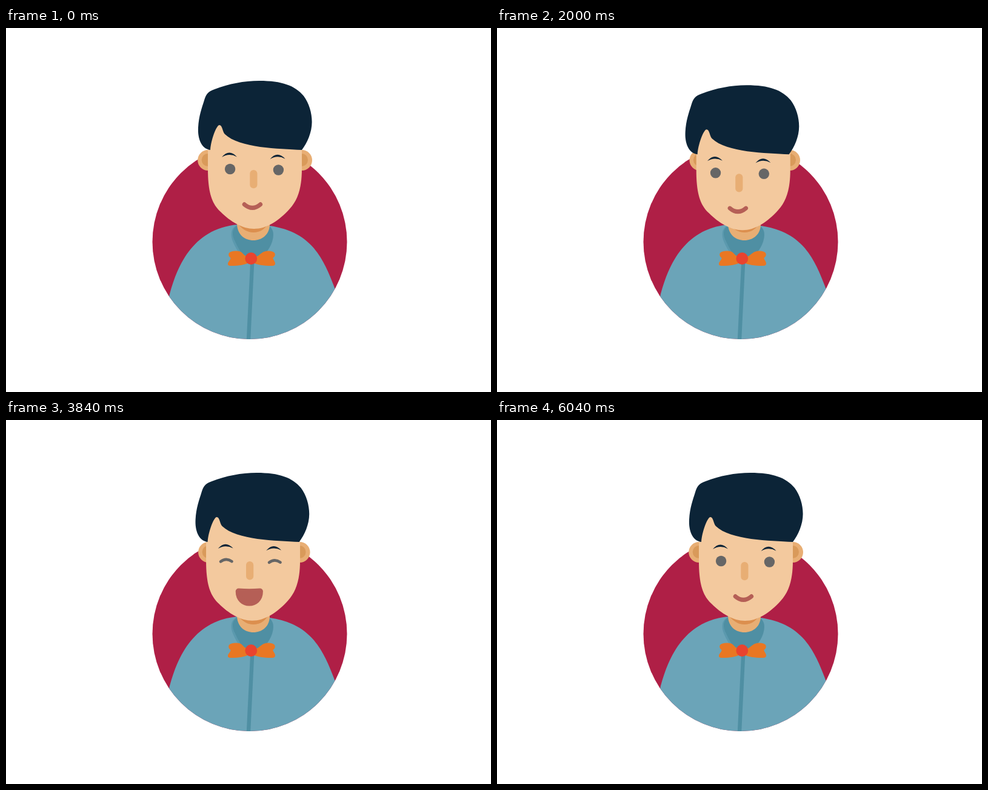
An HTML page for the animation above (6.08 s loop, 800 by 600 pixels).

```html
<!DOCTYPE html>
<html lang="en">
<head>
<meta charset="utf-8">
<title>Portrait</title>
<style>
  html, body { margin: 0; width: 100%; height: 100%; overflow: hidden; background: #fff; }
  svg { display: block; width: 800px; height: 600px; }
  .dark { fill: #0c2437; }
  .skin { fill: #f3c99e; }
  .tan { fill: #e8ae74; }
  .inner { fill: #d99a5a; }
  .teal { fill: #4f8fa3; }
  .bow { fill: #e97723; }
  .eye { fill: #666; }
  .lid { fill: none; stroke: #666; stroke-width: 4.6; stroke-linecap: round; }
  #mouth { fill: #b55f56; stroke: #b55f56; stroke-linejoin: round; }
</style>
</head>
<body>
<svg viewBox="0 0 800 600">
  <defs>
    <clipPath id="disc"><circle cx="402" cy="352.5" r="160.5"/></clipPath>
    <path id="brow" class="dark" d="M356 213Q368 198.500 381 212.500Q368 205.500 356 213Z"/>
  </defs>

  <circle cx="402" cy="352.5" r="160.5" fill="#af1f46"/>
  <g clip-path="url(#disc)">
    <path fill="#6ba4b8" d="M269 443C281 396 306 331 382 324L435 326C503 336 523 377 543 431L570 520H240Z"/>
    <path class="teal" d="M403 388H409.300L403.200 514H396.800Z"/>
  </g>

  <path fill="#5b99ae" d="M381 325C369 331 370 343 375 354C380 365 386 374 391 379L400 379L384 325Z"/>
  <path class="teal" d="M382 325C372 331 372 341 378 352C383 363 389 374 396 380L416 380C428 374 438 361 440.500 346C442 337 440 331 434 326Z"/>
  <path class="tan" d="M381 300V324C382 341 394 350 408 350C422 350 434 341 435 325V300Z"/>
  <path fill="#dc8f4e" d="M381 300V321C390 332 398 337 408 337C420 337 428 331 435 318V300Z"/>

  <path class="bow" d="M404 379L394 375C389 371 390 368 380 367.500C370 367 366 371 367.500 375C368 378 371 378 370.500 380C370 383 366 385 366 389C366 392 368 392 372 392C384 392 394 391 404 385Z"/>
  <path class="bow" d="M404 379L415 376C421 372 423 368 432 367.500C441 367 445 371 443.500 375C443 378 440 378 440.500 380C441 382 444 385 444 388C444 392 441 392 437 392C425 392 414 391 404 385Z"/>
  <circle cx="404.300" cy="380" r="9.900" fill="#e9432f"/>

  <g id="earL"><circle class="tan" cx="333.200" cy="218" r="17"/><circle class="inner" cx="333.200" cy="217.500" r="10.500"/></g>
  <g id="earR"><circle class="tan" cx="488" cy="218" r="17"/><circle class="inner" cx="487.500" cy="217.500" r="10.500"/></g>
  <path id="face" class="skin" d="M333 150V232C333 272 340 290 354 303C370 319 390 331 409 331C430 331 450 318 468 298C482 283 488 262 488 232V150Z"/>

  <g id="features">
    <use href="#brow"/>
    <use href="#brow" x="79.500" y="3.200"/>
    <ellipse class="eye" cx="369.600" cy="232.500" rx="8.700" ry="8.700"/>
    <ellipse class="eye" cx="449.400" cy="234" rx="8.700" ry="8.700"/>
    <path class="lid" d="M360.300 234.200Q369.500 227.600 378.800 234"/>
    <path class="lid" d="M440.300 235.700Q449.500 229.100 458.800 235.500"/>
    <rect class="tan" x="402.300" y="234" width="12.200" height="30.300" rx="6"/>
    <path id="mouth"/>
  </g>

  <path id="hair" class="dark" d="M337 201C322 199 316 182 317 164C318 145 323 132 327 119C330 109 333 105 344 101C368 92 392 87 418 87C455 87 477 95 491 112C500 124 504.600 140 504.600 155C504.600 172 497 189 488 201C450 199 385 198 361 175C357 171 357 160 352 160C347 160 338 185 337 201Z"/>
</svg>

<script>
const LOOP = 6080, STEP = 40;
const $ = id => document.getElementById(id);
const eyes = document.querySelectorAll('.eye');
const lids = document.querySelectorAll('.lid');

// [time, look x, look y]
const looks = [
  [0, 0, 0], [800, 17.5, -5], [840, 17.5, -5], [1540, -15, .5], [1770, -15, .5],
  [2305, 0, 15.2], [2500, .5, 15.2], [3080, 16.3, -.5], [3490, 16.3, -.5],
  [3990, -12.5, -1], [4660, 18, -10.6], [5180, -15, -15.3], [5430, -15, -15.3],
  [6020, 0, 0], [LOOP, 0, 0]
];

// Mouth: left, right, corner y, top control y, lower controls x1, x2, y, stroke
const smile = [393.2, 419.6, 290.8, 302, 410.8, 402, 298.3, 7];
const open = [390, 425.2, 283.5, 284.8, 425.2, 390, 308.8, 10];

const mix = (a, b, k) => a + (b - a) * k;
const ease = k => k * k * (3 - 2 * k);
const ramp = (t, a, b) => ease(Math.min(1, Math.max(0, (t - a) / (b - a))));
const pulse = (t, a, b, c, d) => ramp(t, a, b) - ramp(t, c, d);
const move = (id, x, y) => $(id).setAttribute('transform', `translate(${x} ${y})`);

function look(t) {
  const i = looks.findIndex(p => p[0] > t);
  const a = looks[i - 1], b = looks[i];
  const k = ramp(t, a[0], b[0]);
  return [mix(a[1], b[1], k), mix(a[2], b[2], k)];
}

function drawMouth(k) {
  const [l, r, y, top, x1, x2, low, w] = smile.map((v, i) => mix(v, open[i], k));
  const mid = (l + r) / 2;
  $('mouth').setAttribute('d', `M${l} ${y}Q${mid} ${top} ${r} ${y}C${x1} ${low} ${x2} ${low} ${l} ${y}Z`);
  $('mouth').setAttribute('stroke-width', w);
}

function drawEyes(k) {
  eyes.forEach(e => {
    e.setAttribute('ry', mix(8.7, 2, k));
    e.style.opacity = k < .85 ? 1 : 0;
  });
  lids.forEach(l => l.style.opacity = k < .85 ? 0 : 1);
}

function draw(t) {
  const [x, y] = look(t);
  move('features', x, y);
  move('face', x * .47, y * .37);
  move('hair', x * (x > 0 ? .54 : .7), Math.max(0, y) * 1.13);
  move('earL', x * (x > 0 ? .43 : -.14), 0);
  move('earR', x * (x > 0 ? -.25 : .55), 0);
  drawMouth(pulse(t, 2620, 2900, 4700, 4950));
  drawEyes(pulse(t, 2700, 2900, 3850, 4050));
}

const start = performance.now();
function tick() {
  const t = (performance.now() - start) % LOOP;
  draw(Math.floor(t / STEP) * STEP);
  requestAnimationFrame(tick);
}
tick();
</script>
</body>
</html>
```
